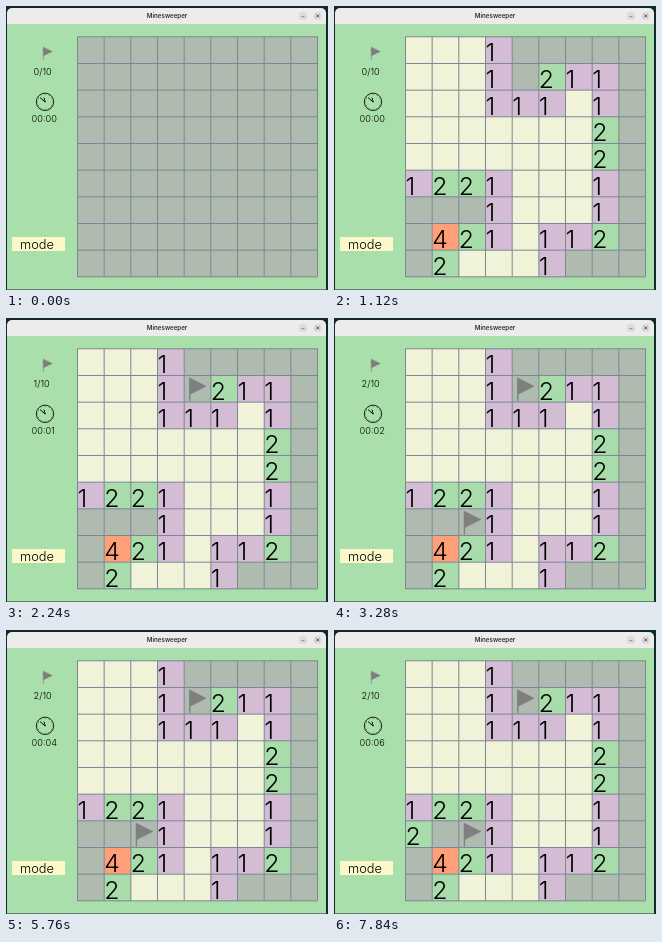
These frames come from a looping animation (322 px wide and 284 px high, 8000 ms). An HTML page with a canvas:

```html
<!DOCTYPE html>
<html lang="en">
<head>
<meta charset="utf-8">
<title>Minesweeper</title>
<style>
  html, body { margin: 0; width: 100%; height: 100%; overflow: hidden; background: #a8dfaa; }
  canvas { display: block; width: 322px; height: 284px; }
</style>
</head>
<body>
<canvas id="stage" width="322" height="284"></canvas>
<script>
const ctx = document.getElementById('stage').getContext('2d');
const LOOP = 8000, START = 1120;
const FIRST_FLAG = 1760, SECOND_FLAG = 3040, LAST_OPEN = 7520;
const LEFT = 71.5, TOP = 30.8, CELL = 26.67, SIZE = 9;

// '#' is covered, '.' is open and empty
const BOARD = [
  '...1#####',
  '...1#211#',
  '...111.1#',
  '.......2#',
  '.......2#',
  '1221...1#',
  '###1...1#',
  '#421.112#',
  '#2...1###'
];
const FILL = { '#': '#b0bbb0', '.': '#f1f3d9', 1: '#d3bcd4', 2: '#a8dcaa', 4: '#ff9f78' };

function box(x, y, w, h, color) {
  ctx.fillStyle = color;
  ctx.fillRect(x, y, w, h);
}

function text(str, x, y, size, weight = 300, align = 'left', color = '#000') {
  ctx.font = `${weight} ${size}px Inter, sans-serif`;
  ctx.textAlign = align;
  ctx.fillStyle = color;
  ctx.fillText(str, x, y);
}

function path(points, color, width = 1) {
  ctx.beginPath();
  points.forEach(([x, y]) => ctx.lineTo(x, y));
  ctx.strokeStyle = color;
  ctx.lineWidth = width;
  ctx.stroke();
}

function disc(x, y, r, color) {
  ctx.beginPath();
  ctx.arc(x, y, r, 0, Math.PI * 2);
  ctx.fillStyle = color;
  ctx.fill();
}

function flag(x, y, scale) {
  ctx.save();
  ctx.translate(x, y);
  ctx.scale(scale, scale);
  path([[0, 0], [0, 23.5]], '#7f7f80', 1.3);
  ctx.beginPath();
  ctx.moveTo(0, 0);
  ctx.lineTo(17, 8.5);
  ctx.lineTo(0, 17);
  ctx.fillStyle = '#7f7f80';
  ctx.fill();
  ctx.restore();
}

function clock(x, y, r) {
  ctx.beginPath();
  ctx.arc(x, y, r, 0, Math.PI * 2);
  ctx.strokeStyle = '#1c261c';
  ctx.lineWidth = 1;
  ctx.stroke();
  for (let i = 0; i < 12; i++) {
    const a = i * Math.PI / 6, c = Math.cos(a), s = Math.sin(a);
    path([[x + c * (r - 1.6), y + s * (r - 1.6)], [x + c * r, y + s * r]], '#1c261c', 0.5);
  }
  path([[x - 5, y - 4.2], [x + 0.3, y + 0.3], [x - 1, y - 4.2]], '#111', 1);
}

function drawWindow() {
  box(0, 0, 322, 284, '#12292a');
  ctx.beginPath();
  ctx.roundRect(1, 2, 319, 30, [5, 5, 0, 0]);
  ctx.fillStyle = '#ececec';
  ctx.fill();
  box(1, 18, 319, 265.5, '#a8dfaa');
  text('Minesweeper', 161, 12.1, 6.2, 600, 'center', '#333');
  disc(297, 9.9, 4.3, '#dcdcdc');
  disc(311.7, 9.9, 4.3, '#dcdcdc');
  path([[295.5, 10.7], [298.5, 10.7]], '#666', 0.7);
  path([[310.2, 8.4], [313.2, 11.4]], '#333', 0.8);
  path([[313.2, 8.4], [310.2, 11.4]], '#333', 0.8);
}

function drawPanel(flags, seconds) {
  flag(37.3, 40.9, 0.55);
  text(flags + '/10', 27.6, 69.2, 9.2);
  clock(39, 95.8, 8.7);
  text('00:' + String(seconds).padStart(2, '0'), 25.6, 116, 9.2);
  box(6, 231, 53, 14, '#fbf8c9');
  text('mode', 14, 242.6, 12.8);
}

function drawBoard(t, flags) {
  const at = i => i * CELL;
  for (let row = 0; row < SIZE; row++) {
    for (let col = 0; col < SIZE; col++) {
      let v = t < START ? '#' : BOARD[row][col];
      if (row === 6 && col === 0 && t >= LAST_OPEN) v = '2';
      const x = LEFT + at(col), y = TOP + at(row);
      box(x, y, CELL, CELL, FILL[v]);
      if (v > 0) text(v, x, y + 24.6, 24.8);
    }
  }
  const end = SIZE * CELL;
  for (let i = 0; i <= SIZE; i++) {
    const x = LEFT + at(i), y = TOP + at(i);
    path([[x, TOP], [x, TOP + end]], '#7b8796');
    path([[LEFT, y], [LEFT + end, y]], '#7b8796');
  }
  [[4, 1], [2, 6]].slice(0, flags).forEach(([col, row]) =>
    flag(LEFT + at(col) + 5.6, TOP + at(row) + 2.3, 1));
}

function frame(now) {
  const t = now % LOOP;
  const flags = (t >= FIRST_FLAG) + (t >= SECOND_FLAG);
  const seconds = Math.max(0, Math.floor((t - START) / 1000));
  drawWindow();
  drawPanel(flags, seconds);
  drawBoard(t, flags);
  requestAnimationFrame(frame);
}
requestAnimationFrame(frame);
</script>
</body>
</html>
```
